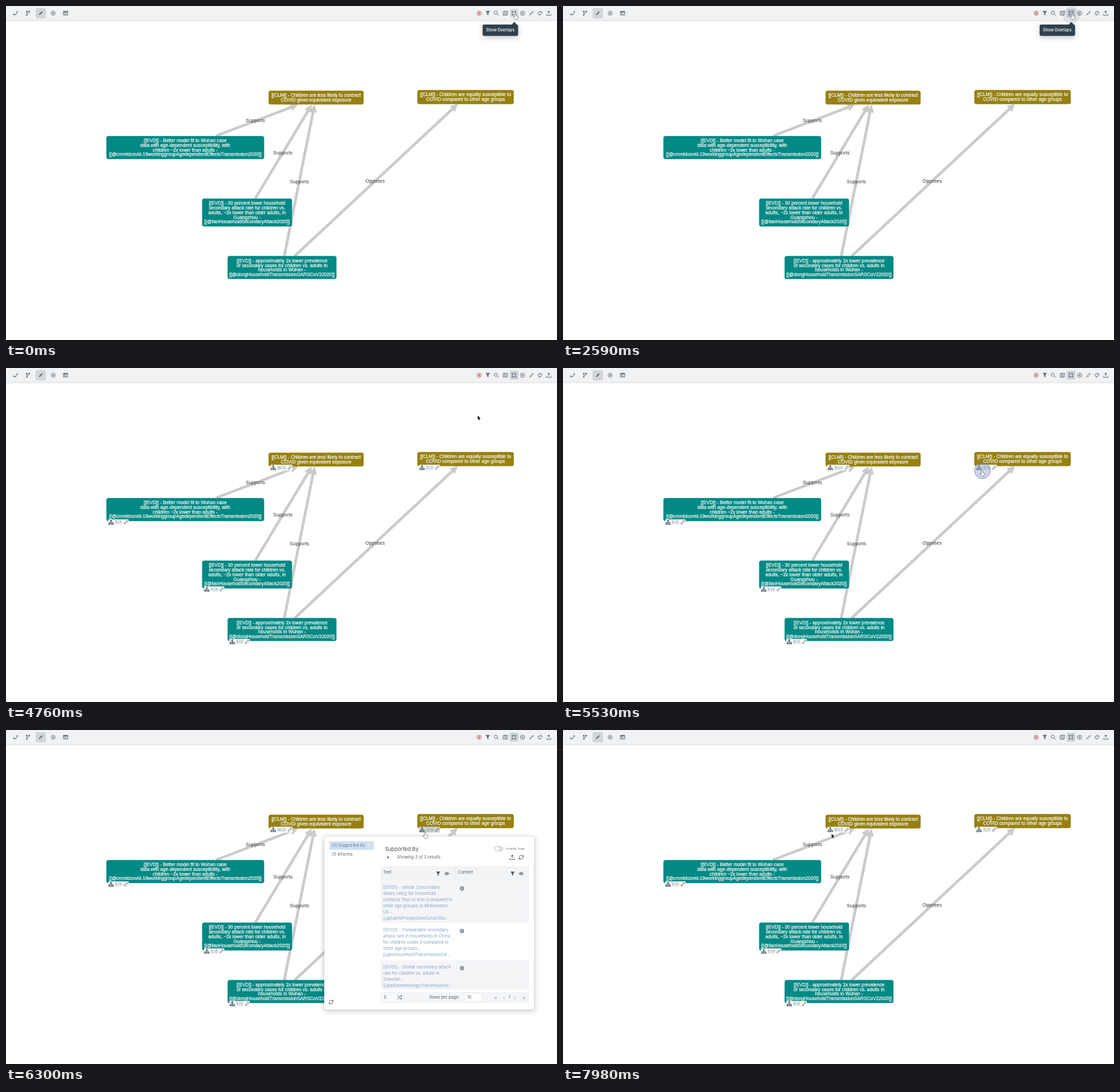
An HTML page with a canvas for the animation above (8 s loop, 800 by 486 pixels).

```html
<!DOCTYPE html>
<html lang="en">
<head>
<meta charset="utf-8">
<title>Discourse graph overlays</title>
<style>
html, body { margin: 0; width: 100%; height: 100%; overflow: hidden; background: #fff; }
canvas { display: block; width: 800px; height: 486px; }
</style>
</head>
<body>
<canvas id="stage"></canvas>
<script>
const LOOP = 8000;
const canvas = document.getElementById('stage');
const ctx = canvas.getContext('2d');
const dpr = window.devicePixelRatio || 1;
canvas.width = 800 * dpr;
canvas.height = 486 * dpr;

const UI = 'Inter, sans-serif';
const GRAPH = '"Liberation Sans", Arial, sans-serif';
const OLIVE = '#97800f', TEAL = '#008985', INK = '#626d77', BODY = '#59636d';

const nodes = [
  { x: 381.5, y: 123.5, w: 137.5, h: 19.5, fill: OLIVE, top: 129.6, count: '16 | 3', tag: [388, 145, 24],
    lines: ['[[CLM]] - Children are less likely to contract', 'COVID given equivalent exposure'] },
  { x: 597.5, y: 122.5, w: 139.5, h: 20, fill: OLIVE, top: 129, count: '3 | 3', tag: [604, 145, 22],
    lines: ['[[CLM]] - Children are equally susceptible to', 'COVID compared to other age groups'] },
  { x: 146, y: 189.5, w: 228.5, h: 33, fill: TEAL, top: 195.6, count: '6 | 5', tag: [152.5, 224.5, 21.5],
    lines: ['[[EVD]] - Better model fit to Wuhan case', 'data with age-dependent susceptibility, with',
      'children ~2x lower than adults -', '[[@cmmidcovid-19workinggroupAgedependentEffectsTransmission2020]]'] },
  { x: 285, y: 280.5, w: 130, h: 40, fill: TEAL, top: 286.8, count: '5 | 6', tag: [291.5, 322, 21.5],
    lines: ['[[EVD]] - 30 percent lower household', 'secondary attack rate for children vs.',
      'adults, ~2x lower than older adults, in', 'Guangzhou -', '[[@lianHouseholdSecondaryAttack2020]]'] },
  { x: 322, y: 364, w: 157.5, h: 33, fill: TEAL, top: 370.4, count: '8 | 5', tag: [328.5, 398.5, 21.5],
    lines: ['[[EVD]] - approximately 2x lower prevalence', 'of secondary cases for children vs. adults in',
      'households in Wuhan -', '[[@dongHouseholdTransmissionSARSCoV22020]]'] }
];
const edges = [
  [305, 189, 424, 143.5, 'Supports', 362, 167],
  [362, 280, 444, 143.5, 'Supports', 402, 213.5],
  [404, 364, 448, 143.5, 'Supports', 426, 255.5],
  [419, 364, 656, 142.5, 'Opposes', 536, 254.5]
];

// Icon paths live in a box from -5 to 5.
const icons = {
  graph: ['M-4 3h4M0 3l3-5M-4 3v-3', 'M-5 2h2v2h-2zM-1 2h2v2h-2zM2 -4h2.5v2.5H2z'],
  branch: ['M-2.5 -3V4M-2.5 2C-2.5 0 2.5 1 2.5 -3', 'M-4 -5h3v3h-3zM-4 3h3v2h-3zM1 -5h3v3H1z'],
  pencil: ['M-3 3L3 -3', 'M-4 4l.7-2.5L2 -4 4 -2-1.5 3.3z'],
  target: ['M4.2 0A4.2 4.2 0 1 1 -4.2 0A4.2 4.2 0 1 1 4.2 0', 'M1.7 0A1.7 1.7 0 1 1 -1.7 0A1.7 1.7 0 1 1 1.7 0'],
  plus: ['M4.5 0A4.5 4.5 0 1 1 -4.5 0A4.5 4.5 0 1 1 4.5 0M-2.2 0h4.4M0 -2.2v4.4', ''],
  pane: ['M-4.5 -3.8h9v7.6h-9zM-2.5 0h2M-2.5 2h5', 'M-4.5 -4h9v2.5h-9z'],
  filter: ['', 'M-4.5 -4.5h9L1.3 0V4.5L-1.3 3V0z'],
  search: ['M2.2 -1A3.4 3.4 0 1 1 -4.6 -1A3.4 3.4 0 1 1 2.2 -1M1.5 1.7L4.8 5', ''],
  map: ['M-4.5 -3.5l3-1 3 1 3-1v8l-3 1-3-1-3 1zM-1.5 -4v7M1.5 -3v7', ''],
  frame: ['M-3.4 -3.4h6.8v6.8h-6.8z', 'M-4.5 -4.5h2v2h-2zM2.5 -4.5h2v2h-2zM-4.5 2.5h2v2h-2zM2.5 2.5h2v2h-2z'],
  shrink: ['M4.5 -4.5L1 -1M-4.5 4.5L-1 1', 'M.5 -.5V-4L4 -.5zM-.5 .5V4L-4 .5z'],
  palette: ['M-3 3.2C-6 0 -3 -4.3 1 -4 5 -3.5 5 0 2 1.5 0 2.4 1 4.5 -3 3.2', 'M-2.8 -1.8h1.6v1.6h-1.6zM.4 -2.8H2v1.6H.4zM-1 2h2v2h-2z'],
  upload: ['M-4.5 1.5v3h9v-3M0 2V-4', 'M0 -5.2L3 -2H-3z'],
  tree: ['M0 -2V0M-3.6 2V0h7.2v2M0 0v2', 'M-1.5 -4.6h3v2.8h-3zM-5 1.8h2.8v2.8h-2.8zM-1.4 1.8h2.8v2.8h-2.8zM2.2 1.8H5v2.8H2.2z'],
  link: ['M-1.5 1.5l3-3M0 -2L2 -4 4 -2 2 0M0 2L-2 4-4 2-2 0', ''],
  reload: ['M-4 0A4 4 0 0 1 3 -2.6M4 0A4 4 0 0 1 -3 2.6', 'M4.6 -5v4h-4zM-4.6 5V1h4z'],
  eye: ['M-4.8 0Q0 -5.5 4.8 0Q0 5.5 -4.8 0', 'M1.6 0A1.6 1.6 0 1 1 -1.6 0A1.6 1.6 0 1 1 1.6 0'],
  shuffle: ['M-4.5 -3h2l5 6H4M-4.5 3h2l5-6H4', 'M3 -5l2.4 2L3 -1zM3 5l2.4-2L3 1z']
};

const ease = u => u < 0 ? 0 : u > 1 ? 1 : u * u * (3 - 2 * u);
const span = (t, a, b) => ease((t - a) / (b - a));
const mix = (a, b, u) => a + (b - a) * u;

function text(s, x, y, size, color, opt = {}) {
  ctx.font = `${opt.style || ''} ${opt.weight || 400} ${size}px ${opt.family || UI}`;
  ctx.textAlign = opt.align || 'left';
  ctx.textBaseline = 'alphabetic';
  ctx.fillStyle = color;
  ctx.fillText(s, x, y + size * .35);
}
function box(x, y, w, h, fill, r = 0, stroke) {
  ctx.beginPath();
  ctx.roundRect(x, y, w, h, r);
  if (fill) { ctx.fillStyle = fill; ctx.fill(); }
  if (stroke) { ctx.strokeStyle = stroke; ctx.lineWidth = .6; ctx.stroke(); }
}
function dot(x, y, r, fill) {
  ctx.beginPath();
  ctx.arc(x, y, r, 0, 7);
  ctx.fillStyle = fill;
  ctx.fill();
}
function icon(name, x, y, size = 7, color = INK) {
  const [line, solid] = icons[name];
  ctx.save();
  ctx.translate(x, y);
  ctx.scale(size / 10, size / 10);
  ctx.strokeStyle = ctx.fillStyle = color;
  ctx.lineWidth = 1.2;
  ctx.stroke(new Path2D(line));
  ctx.fill(new Path2D(solid));
  ctx.restore();
}

function drawEdges() {
  for (const [x1, y1, x2, y2] of edges) {
    const len = Math.hypot(x2 - x1, y2 - y1);
    ctx.save();
    ctx.translate(x1, y1);
    ctx.rotate(Math.atan2(y2 - y1, x2 - x1));
    ctx.fillStyle = '#cbcbcb';
    ctx.fillRect(0, -2, len - 8, 4);
    ctx.beginPath();
    ctx.moveTo(len, 0);
    ctx.lineTo(len - 11, -5.7);
    ctx.lineTo(len - 11, 5.7);
    ctx.fill();
    ctx.restore();
  }
  for (const [, , , , label, x, y] of edges)
    text(label, x, y, 7, '#3a3a3a', { family: GRAPH, align: 'center' });
}
function drawNode(n) {
  box(n.x, n.y, n.w, n.h, n.fill, 2.5, n.fill);
  n.lines.forEach((s, i) => {
    const x = n.x + n.w / 2, y = n.top + i * 6.8;
    text(s, x, y, 6.8, '#eef2ee', { family: GRAPH, align: 'center' });
    ctx.strokeStyle = 'rgba(238,242,238,.5)';
    ctx.lineWidth = .5;
    ctx.lineJoin = 'round';
    ctx.strokeText(s, x, y + 6.8 * .35);
  });
}
function drawTag(n, active) {
  const [x, y, w] = n.tag;
  box(x - 4, y - 4.3, w + 8, 8.6, active ? '#d0d5da' : '#fbfcfc', 1);
  box(x + 5, y - 3.3, w - 10, 6.6, active ? '#c2cad1' : '#e9ecef', 1);
  icon('tree', x, y, 7.5, '#56616b');
  text(n.count, x + w / 2, y, 4.4, '#7d8892', { align: 'center' });
  icon('link', x + w, y, 7, '#56616b');
}

function drawBar(t) {
  const shade = ctx.createLinearGradient(0, 20, 0, 23);
  shade.addColorStop(0, 'rgba(70,80,90,.22)');
  shade.addColorStop(1, 'rgba(70,80,90,0)');
  ctx.fillStyle = shade;
  ctx.fillRect(0, 20, 800, 3);
  box(0, 0, 800, 20.5, '#f0f2f4');
  box(43, 3, 15, 15, '#d2d6da', 1.5);
  box(731.5, 4, 12.5, 13, t < 2590 ? '#d9dde0' : t < 4450 ? '#c3c9cf' : '#cfd4d9', 1.5);
  [['graph', 14], ['branch', 32], ['pencil', 50.5], ['target', 68.5], ['pane', 86.5], ['target', 687, '#b94a4c'],
    ['filter', 699.5], ['search', 712], ['map', 725], ['frame', 737.5], ['plus', 750], ['shrink', 763],
    ['palette', 775.5], ['upload', 788]].forEach(([name, x, color]) => icon(name, x, 10.5, 7, color));
}
function drawTip(alpha) {
  if (alpha <= 0) return;
  ctx.save();
  ctx.globalAlpha = alpha;
  ctx.shadowColor = 'rgba(16,22,26,.25)';
  ctx.shadowBlur = 8 * dpr;
  ctx.shadowOffsetY = 2 * dpr;
  box(692, 27, 51.5, 16.5, '#30404d', 2);
  ctx.shadowColor = 'transparent';
  ctx.beginPath();
  ctx.moveTo(738, 23);
  ctx.lineTo(742, 27.5);
  ctx.lineTo(734, 27.5);
  ctx.fill();
  text('Show Overlays', 717.7, 35.3, 5.7, '#f4f7f9', { weight: 600, align: 'center' });
  ctx.restore();
}

const rows = [
  [219, 62, ['[[EVD]] - similar [[secondary', 'attack rate]] for household', 'contacts 18yo or less (compared to',
    'other age groups) in Midwestern', 'US -', '[[@halimiProspectiveCohortStu...']],
  [281, 54, ['[[EVD]] - Comparable secondary', 'attack rate in households in China', 'for children under 3 compared to',
    'other age groups -', '[[@luHouseholdTransmissionSA...']],
  [335, 43, ['[[EVD]] - Similar secondary attack', 'rate for children vs. adults in', 'Shenzen -',
    '[[@qiEpidemiologyTransmissionC...']]
];
function drawPanel(u) {
  if (u <= 0) return;
  ctx.save();
  ctx.globalAlpha = u;
  ctx.translate(614, 152);
  ctx.scale(mix(.7, 1, u), mix(.7, 1, u));
  ctx.translate(-614, -152);
  ctx.save();
  ctx.shadowColor = 'rgba(16,22,26,.24)';
  ctx.shadowBlur = 9 * dpr;
  ctx.shadowOffsetY = 2 * dpr;
  box(462, 154.5, 305, 252.5, '#fff', 2);
  ctx.restore();
  box(462, 154.5, 305, 252.5, null, 2, 'rgba(16,22,26,.14)');

  box(469.5, 162, 64.5, 12.5, '#cfe0f2', 1);
  text('(3) Supported By', 473, 168.2, 6, '#5d7fa6');
  text('(1) Informs', 473, 181, 6, BODY);
  icon('reload', 472, 396, 7);

  text('Supported By', 550, 173.3, 7.6, '#48525c');
  box(709.5, 169.7, 11.5, 6.4, '#e2e5e9', 3.2, '#a3acb4');
  dot(712.8, 172.9, 2.6, '#fff');
  text('Group By Target', 725.5, 173, 3.6, BODY);
  ctx.fillStyle = INK;
  ctx.fill(new Path2D('M553.5 183l3 2.3-3 2.3z'));
  text('Showing 3 of 3 results', 567.5, 185.2, 6, BODY, { style: 'italic' });
  icon('upload', 735, 185.2, 7.5);
  icon('reload', 748, 185.2, 7.5);

  box(544, 198, 215, 21, '#f1f3f5');
  box(652, 198, .6, 21, '#e3e7ea');
  text('Text', 547.5, 207, 6, BODY);
  text('Context', 656, 207, 6, BODY);
  for (const x of [627.5, 735.5]) {
    icon('filter', x, 209, 6.5, '#47525c');
    icon('eye', x + 12.5, 209, 6.8, '#47525c');
  }
  rows.forEach(([y, h, lines], i) => {
    box(544, y, 215, h, i % 2 ? '#fff' : '#f4f5f7');
    lines.forEach((s, k) => text(s, 547.5, y + 10 + k * 9, 6.1, '#84a2c8'));
    dot(662, y + 11.5, 3.2, '#8b959d');
    text('i', 662, y + 11.5, 5, '#fff', { weight: 700, align: 'center' });
  });

  box(544, 381, 215, 16.5, '#f3f5f7');
  box(546, 383, 19, 12, '#f8f9fa', 1);
  text('0', 548.5, 389, 6, BODY);
  icon('shuffle', 571.5, 389, 7);
  text('Rows per page:', 615, 389, 5.9, BODY);
  box(666, 383, 25, 12, '#fff', 1, '#e0e4e8');
  text('10', 669.5, 389, 6, BODY);
  [['«', 711], ['‹', 723], ['1', 731], ['›', 739], ['»', 752]].forEach(([s, x]) =>
    text(s, x, 389, s === '1' ? 6 : 8, s === '1' ? BODY : '#a3abb3', { align: 'center' }));
  ctx.restore();
}

function drawClick(x, y, t, start, end) {
  if (t < start || t > end) return;
  ctx.save();
  ctx.globalAlpha = span(t, start, start + 80) * (1 - span(t, end - 90, end));
  ctx.beginPath();
  ctx.arc(x, y, 11.5, 0, 7);
  ctx.fillStyle = 'rgba(130,150,195,.4)';
  ctx.fill();
  ctx.strokeStyle = 'rgba(95,118,170,.6)';
  ctx.lineWidth = 1;
  ctx.stroke();
  ctx.restore();
}
function drawCursor(t) {
  const go = span(t, 4450, 5150), leave = span(t, 6800, 7200), end = span(t, 7450, 7900);
  let x = mix(739.5, 608.5, go), y = mix(12, 149.5, go);
  x = mix(mix(x, 420, leave), 390, end);
  y = mix(mix(y, 172, leave), 151, end);
  const hand = go < .04 || (go > .97 && leave < .04);
  ctx.save();
  ctx.translate(x, y);
  ctx.lineJoin = 'round';
  const shape = new Path2D(hand
    ? 'M-1 0Q0-1 .9 0V2.8L3 3.2Q4 3.5 3.8 5L3 7.5H-.5L-3 4.6Q-3 3.3-1 4.4z'
    : 'M0 0V6L1.4 4.7 2.4 6.8 3.4 6.3 2.4 4.3H4.2z');
  ctx.fillStyle = hand ? '#fff' : '#111';
  ctx.strokeStyle = hand ? '#333' : '#fff';
  ctx.lineWidth = .9;
  ctx.stroke(shape);
  ctx.fill(shape);
  ctx.restore();
}

function draw(t) {
  ctx.setTransform(dpr, 0, 0, dpr, 0, 0);
  box(0, 0, 800, 486, '#fff');
  const panel = span(t, 5690, 5890) * (1 - span(t, 7200, 7320));
  drawEdges();
  nodes.forEach(drawNode);
  if (t >= 2800) nodes.forEach((n, i) => drawTag(n, i === 1 && panel > 0));
  drawBar(t);
  drawClick(738, 13.5, t, 2560, 2870);
  drawTip(1 - span(t, 2900, 3080));
  drawPanel(panel);
  drawClick(609, 149.5, t, 5390, 5680);
  drawCursor(t);
}

const began = performance.now();
function tick() {
  draw((performance.now() - began) % LOOP);
  requestAnimationFrame(tick);
}
tick();
</script>
</body>
</html>
```
